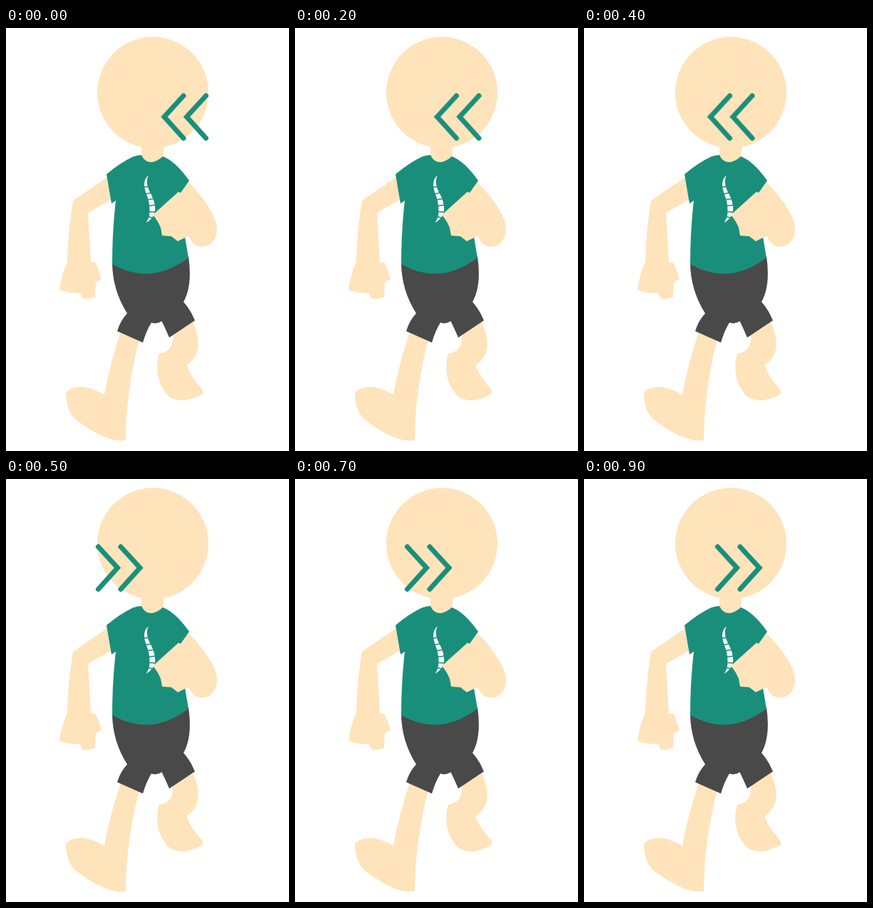
These frames come from a looping animation (397 px wide and 593 px high, 1000 ms). An HTML page:

```html
<!DOCTYPE html>
<html lang="en">
<head>
<meta charset="utf-8">
<title>Walking figure, head turns</title>
<style>
html, body { margin: 0; width: 100%; height: 100%; overflow: hidden; background: #fff; }
svg { display: block; width: 397px; height: 593px; }
.skin { fill: #ffe3bb; }
.shirt { fill: #198f7b; }
.shorts { fill: #494949; }
.cuts { stroke: #198f7b; stroke-width: 1.6; }
#arrows { fill: none; stroke: #198f7b; stroke-width: 7; stroke-linecap: round; }
</style>
</head>
<body>
<svg viewBox="0 0 397 593">
  <g class="skin">
    <circle cx="206" cy="90.5" r="78"/>
    <path d="M190 160L190 182Q204 200 220 184L222 160Z"/>
    <path d="M143 208.500L94 242Q87 285 86 328Q78 345 75 367Q88 372 104 371.500L107 379Q115 381 125 377L126 356L134 352Q131 341 125 328.500L119 329L115 259L150 239Z"/>
    <path d="M161 426Q146 470 138 514Q118 503 105 503Q90 504 84 511Q84 537 98 549Q141 582 168 578Q168 510 187 436Z"/>
    <path d="M234 428Q237 453 214.500 457Q207 490 224 511Q229 521 248 522Q259 522 276 513Q277 508 273 504Q258 487 253.500 473Q268 462 269.500 448Q271 431 261 410Z"/>
  </g>
  <path class="shorts" d="M149 328Q203 355 256 320Q262 361 249 384Q259 395 265 410L229 434Q223 420 218.500 411Q212 415.500 204 413Q197 424 192 441L156 425Q160 411 170 400Q149 367 149 328Z"/>
  <path class="shirt" d="M141 205Q160 189 178 180.500Q184 178 190 178C196 191 208 191 220 180Q238 187 257 214L242 236L251 293L256 322Q203 362 149 331Q149 285 154 242L148 246Z"/>
  <path fill="#fff" d="M200 206.500Q190 214 196.500 232Q203 247 201 263Q200 268 196.500 273Q207 267 209 257Q210 246 204 234Q194 217 200 206.500Z"/>
  <path class="cuts" d="M192 223.500L201 222M194 233L206 230.500M197 241L209 239M199 249.500L211 248M199 257.500L212 258M198 264L209 267"/>
  <path class="skin" d="M206 262L242 229.500L245 231L256 216Q285 246 294 270Q300 289 288 302Q278 309 267 305Q260 301 257 292L251 294L241 299L232 292L219 291L217 280Q213 270 206 262Z"/>
  <path id="arrows" d="M0 95L-27 124.500L0 154.500M31.500 95L4.500 124.500L31.500 154.500"/>
</svg>
<script>
// [x, facing]: 1 points left, -1 points right
const poses = [
  [249, 1], [234.5, 1], [226.5, 1], [219, 1], [204.5, 1],
  [161, -1], [175, -1], [189, -1], [205, -1], [219, -1]
];
const frames = [...poses, poses[0]].map(([x, facing], i) => ({
  offset: i / poses.length,
  transform: `translate(${x}px, 0px) scale(${facing}, 1)`,
  easing: 'steps(1, end)'
}));
document.getElementById('arrows').animate(frames, { duration: 1000, iterations: Infinity });
</script>
</body>
</html>
```
